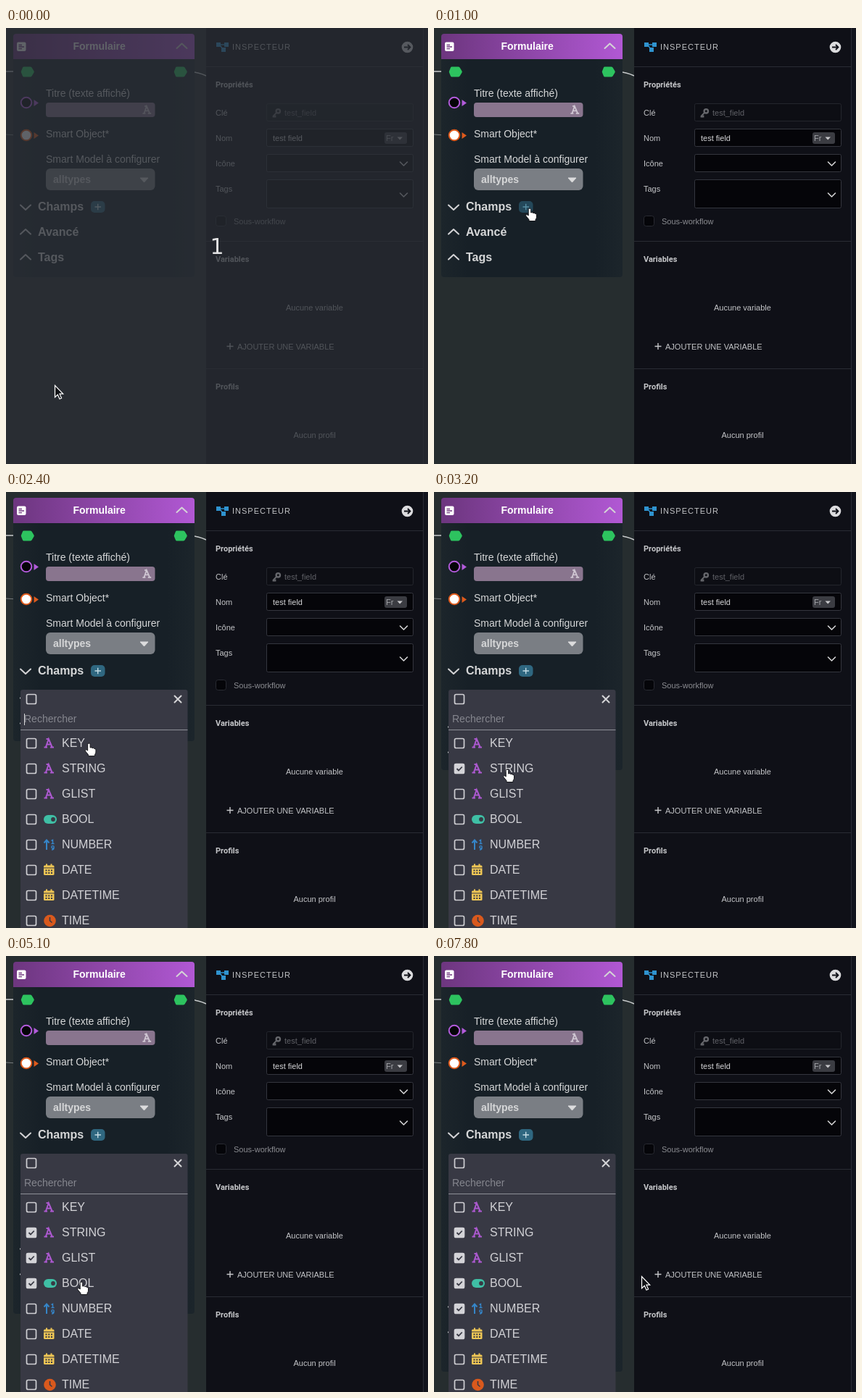
Recreate the animation shown at these times as an HTML page. Size 582 px wide and 602 px high, loop 8000 ms.

```html
<!DOCTYPE html>
<html lang="fr">
<head>
<meta charset="utf-8">
<title>Formulaire</title>
<style>
  html, body { margin: 0; width: 100%; height: 100%; overflow: hidden; background: #262d2f; }
  svg { display: block; width: 582px; height: 602px; font-family: "Liberation Sans", Arial, sans-serif; }
  text { white-space: pre; }
  .line { fill: none; stroke: #d4d4d6; stroke-width: 2; stroke-linecap: round; stroke-linejoin: round; }
  .label { font-size: 14px; fill: #d6d7d8; }
  .section { font-size: 16px; font-weight: bold; fill: #d6d7d8; }
  .row { font-size: 16px; fill: #d2d2d6; }
  .small { font-size: 11px; fill: #c3c4c7; }
  .title { font: bold 11px Roboto, sans-serif; fill: #c6c7ca; }
  .field { fill: #050509; stroke: #34363e; }
  .box { fill: none; stroke: #cfcfd3; stroke-width: 1.7; }
</style>
</head>
<body>
<svg viewBox="0 0 582 602">
  <defs>
    <linearGradient id="head"><stop stop-color="#6d367f"/><stop offset="1" stop-color="#b158d4"/></linearGradient>
    <linearGradient id="body">
      <stop stop-color="#1c252b"/><stop offset=".15" stop-color="#172027"/>
      <stop offset=".85" stop-color="#172027"/><stop offset="1" stop-color="#1c252b"/>
    </linearGradient>
    <path id="hex" d="M4 0H13Q14 0 15 1L18 6Q18.500 7 18 8L15 13Q14 14 13 14H4Q3 14 2.500 13L0.500 8Q0 7 0.500 6L2.500 1Q3 0 4 0Z" fill="#2dc35f"/>
    <path id="up" class="line" d="M0 6.500L7 0L14 6.500"/>
    <path id="down" class="line" d="M0 0L7 6.500L14 0"/>
    <path id="pick" class="line" d="M0 0L5 5L10 0" style="stroke-width:1.600"/>
    <path id="letter" d="M0.500 12.500H5M9 12.500H14M2.800 12.500L6.800 1L11.700 12.500M3.500 1H7.500M4.500 8.500H10" fill="none" stroke-width="2"/>
    <g id="calendar" fill="#eec655">
      <path d="M3 0h2v2h4.500V0h2v2H13q1.500 0 1.500 1.500V5H0V3.500Q0 2 1.500 2H3Z"/>
      <path d="M0 6H14.500V14Q14.500 15.500 13 15.500H1.500Q0 15.500 0 14Z"/>
      <path d="M2.500 9H12M2.500 12.500H12" stroke="#383944" stroke-width="1.800" stroke-dasharray="2 1.750"/>
    </g>
  </defs>

  <rect width="582" height="602" fill="#262d2f"/>
  <path d="M0 60H22M248 60Q264 60 276 66" fill="none" stroke="#c9cccd" stroke-width="1.500"/>
  <path d="M0 147L22 148.500" stroke="#777c7e"/>

  <g id="card">
    <rect id="panel" x="10" y="8" width="250" height="336" rx="4" fill="url(#body)"/>
    <path d="M10 43V12Q10 8 14 8H256Q260 8 260 12V43Z" fill="url(#head)"/>
    <rect x="15" y="19.500" width="12.500" height="12.500" rx="2" fill="#fff"/>
    <path d="M17.500 23.500H22M17.500 26H25M17.500 28.700H22" stroke="#70387f" stroke-width="1.300"/>
    <text x="92.500" y="30" class="label" style="font-weight:bold;fill:#fff">Formulaire</text>
    <use href="#up" x="235.500" y="21.500"/>
    <use href="#hex" x="20.500" y="53.500"/>
    <use href="#hex" x="231.500" y="53.500"/>
    <circle cx="28" cy="103" r="7.300" fill="#050508" stroke="#b35bdb" stroke-width="2"/>
    <path d="M38.500 99L45 103.500L38.500 108Z" fill="#b35bdb"/>
    <circle cx="28" cy="148" r="7.300" fill="#fff" stroke="#de5a1c" stroke-width="2"/>
    <path d="M38.500 144L45 148.500L38.500 153Z" fill="#de5a1c"/>
    <text x="55" y="95" class="label">Titre (texte affiché)</text>
    <rect x="55" y="103" width="150.500" height="20" rx="4" fill="#89758e"/>
    <use href="#letter" transform="translate(188 107) scale(.87)" stroke="#cfc6d2"/>
    <text x="55" y="151" class="label">Smart Object*</text>
    <text x="55" y="186" class="label">Smart Model à configurer</text>
    <rect x="55" y="194" width="150.500" height="30" rx="6" fill="#7a7e84"/>
    <text x="65" y="214" class="label" style="font-weight:bold">alltypes</text>
    <path d="M185 207H196L190.500 213Z" fill="#dcdcdd" stroke="#dcdcdd" stroke-linejoin="round"/>
    <use href="#down" x="20" y="244.500"/>
    <text x="44" y="252" class="section">Champs</text>
    <rect id="add" x="117" y="239" width="19.500" height="16" rx="5"/>
    <path id="addSign" d="M122.500 247H131M126.700 242.700V251.300" stroke-width="1.400"/>
    <g id="below">
      <use href="#up" x="20" y="278"/>
      <text x="44" y="287" class="section">Avancé</text>
      <use href="#up" x="20" y="313"/>
      <text x="44" y="322" class="section">Tags</text>
    </g>
  </g>

  <g id="menu">
    <path d="M20 602V276Q20 273 23 273H247.500Q250.500 273 250.500 276V602Z" fill="#383944"/>
    <rect x="28.500" y="279.500" width="13" height="13" rx="2" class="box"/>
    <path class="line" d="M232.500 281.500L241.500 290.500M241.500 281.500L232.500 290.500"/>
    <text x="25" y="318" class="label" style="fill:#85868e">Rechercher</text>
    <rect id="caret" x="25" y="306" width="1" height="16" fill="#d8d8da"/>
    <path d="M20 328.500H250.500" stroke="#8d8f97"/>
    <g id="rows"></g>
    <g stroke="#ac59cf">
      <use href="#letter" x="52" y="340"/><use href="#letter" x="52" y="375"/><use href="#letter" x="52" y="410"/>
    </g>
    <rect x="52" y="446" width="18" height="12" rx="6" fill="#3fbfa5"/>
    <circle cx="65" cy="452" r="2.900" fill="#383944"/>
    <path d="M56 494V481M52.500 484.500L56 480.500L59.500 484.500" fill="none" stroke="#3585c8" stroke-width="2"/>
    <path d="M62.500 481.500L64.500 480.500V485.500M62.500 485.500H66.500M66 490.500V491.500Q66 494 63 494M66.200 490.300a1.700 1.700 0 1 1 -3.400 0a1.700 1.700 0 1 1 3.400 0" fill="none" stroke="#3585c8" stroke-width="1.400"/>
    <use href="#calendar" x="52" y="513.500"/>
    <use href="#calendar" x="52" y="548.500"/>
    <circle cx="60.500" cy="592" r="8.300" fill="#d9591d"/>
    <path d="M60.500 587V592L63.500 594.500" fill="none" stroke="#383944" stroke-width="1.600"/>
  </g>

  <g id="inspector">
    <rect x="276" width="306" height="602" fill="#0f1017"/>
    <rect x="576" width="6" height="602" fill="#12141c"/>
    <path d="M575.500 0V602M276 53.500H575M276 294.500H575M276 470.500H575" stroke="#2a2c34"/>
    <path d="M294 23H303M295 24L300 30" stroke="#2f93cf" stroke-width="1.500"/>
    <path d="M290 20h6v6h-6ZM301 20h6v6h-6ZM297 27h6v6h-6Z" fill="#2f93cf"/>
    <text x="312" y="30" class="small" letter-spacing="1">INSPECTEUR</text>
    <circle cx="553.500" cy="26.500" r="7.800" fill="#dcdcde"/>
    <path d="M549 26.500H557.500M554 23L557.500 26.500L554 30" fill="none" stroke="#0f1017" stroke-width="1.800"/>
    <rect x="359.500" y="104.500" width="202" height="24" rx="2" class="field" style="fill:#0d0e14;stroke:#24262d"/>
    <rect x="359.500" y="139.500" width="202" height="24" rx="2" class="field"/>
    <rect x="359.500" y="174.500" width="202" height="24" rx="2" class="field"/>
    <rect x="359.500" y="209.500" width="202" height="39" rx="2" class="field"/>
    <rect x="289.500" y="259.500" width="14" height="14" rx="3" class="field" style="stroke:#292b32"/>
    <circle cx="375.300" cy="114.800" r="2.700" fill="none" stroke="#66676c" stroke-width="2.400"/>
    <path d="M373 117L368.500 121.500V122.500H371.500V120.500" fill="none" stroke="#66676c" stroke-width="1.800"/>
    <rect x="522" y="144" width="31" height="16" rx="3" fill="#3b3c42"/>
    <path d="M539.500 150.500H547L543.200 154.500Z" fill="#c9c9cc"/>
    <use href="#pick" x="543.500" y="185"/>
    <use href="#pick" x="543.500" y="228"/>
    <path d="M304.500 439.500H313.500M309 435V444" stroke="#c6c7ca" stroke-width="1.400"/>
    <g id="texts"></g>
  </g>

  <g id="veil">
    <rect width="582" height="602" fill="#2a2e35" fill-opacity=".75"/>
    <text x="291" y="312" text-anchor="middle" style="font:30px 'DejaVu Sans',sans-serif;fill:#e2e2e3">1</text>
  </g>

  <path id="arrow" d="M0.500 0.500V16.800L4.300 13.300L7 19.200L9.600 18L7 12.200H11.700Z" fill="#101216" stroke="#fff" stroke-width="1.200"/>
  <path id="hand" d="M-1.800 1.500Q-1.800 0 0 0Q1.700 0 1.700 1.500V6Q3.500 5 4.700 6.500Q6.300 5.700 7.300 7.300Q9.500 6.800 9.500 9V12Q9.500 14 8 15.500V17.500H-1V15.500L-5 10.800Q-5.700 9.500 -4.500 8.800Q-3.300 8.300 -1.800 10Z" fill="#fff" stroke="#15161a" stroke-width="1"/>
</svg>
<script>
const $ = id => document.getElementById(id);
const LOOP = 8000, TICK = 100, MENU_AT = 1300;

// Moments at which a list row gets ticked
const ticks = { STRING: 3000, GLIST: 4000, BOOL: 5100, NUMBER: 6100, DATE: 7100 };
const names = ['KEY', 'STRING', 'GLIST', 'BOOL', 'NUMBER', 'DATE', 'DATETIME', 'TIME'];

// Pointer hot spot: time, x, y
const path = [
  [0, 67, 493], [100, 67, 493], [900, 131, 250], [1000, 132, 249], [1600, 132, 249],
  [2100, 116, 343], [2300, 116, 343], [2700, 106, 369], [2900, 106, 369], [3200, 101, 383],
  [3700, 102, 409], [4100, 102, 409], [4500, 103, 451], [5000, 103, 451], [5100, 104, 450],
  [5200, 104, 455], [5300, 104, 455], [5600, 107, 482], [6200, 107, 482], [6400, 110, 510],
  [6700, 110, 510], [6800, 108, 511], [7200, 108, 511], [7800, 286, 442], [LOOP, 286, 442]
];

const labels = [
  ['Propriétés', 289, 82, 'title'], ['Variables', 289, 323, 'title'], ['Profils', 289, 499, 'title'],
  ['Clé', 289, 121], ['Nom', 289, 156], ['Icône', 289, 191], ['Tags', 289, 226],
  ['test_field', 384, 121, 'small', '#606167'], ['test field', 368, 156, 'small', '#d6d6d8'],
  ['Fr', 524, 156, 'small', '#a5a6aa'], ['Sous-workflow', 314, 271, 'small', '#8b8c91'],
  ['Aucune variable', 386, 390], ['AJOUTER UNE VARIABLE', 319, 444], ['Aucun profil', 396.5, 566]
];
$('texts').innerHTML = labels.map(([s, x, y, cls = 'small', fill]) =>
  `<text x="${x}" y="${y}" class="${cls}"${fill ? ` style="fill:${fill}"` : ''}>${s}</text>`).join('');

$('rows').innerHTML = names.map((name, i) => {
  const y = 347 + 35 * i;
  return `<rect x="28.500" y="${y - 6.5}" width="13" height="13" rx="2" class="box"/>
    <g id="tick${name}"><rect x="28" y="${y - 7}" width="14" height="14" rx="2" fill="#d3d3d7"/>
    <path d="M31.500 ${y}l2.500 2.500l4.700 -5" fill="none" stroke="#383944" stroke-width="1.800"/></g>
    <text x="77" y="${y + 5}" class="row">${name}</text>`;
}).join('');

const show = (id, on) => $(id).setAttribute('visibility', on ? 'visible' : 'hidden');
const move = (id, x, y) => $(id).setAttribute('transform', `translate(${x} ${y})`);

function pointer(t) {
  const i = path.findIndex(p => p[0] > t);
  const [t0, x0, y0] = path[i - 1], [t1, x1, y1] = path[i];
  const u = (t - t0) / (t1 - t0), k = u * u * (3 - 2 * u);
  return [x0 + (x1 - x0) * k, y0 + (y1 - y0) * k];
}

function draw(time) {
  const t = Math.floor(time % LOOP / TICK) * TICK;
  const [x, y] = pointer(t);
  const open = t >= MENU_AT;
  const onAdd = x > 117 && x < 137 && y > 239 && y < 256;
  const onList = open && x > 20 && x < 250 && y > 273;
  const count = Object.values(ticks).filter(at => t >= at).length;

  show('veil', t < 100);
  show('menu', open);
  // hidden children must follow the menu
  names.forEach(n => show('tick' + n, t >= ticks[n]));
  show('caret', open && t < 3000 && !(t >= 1900 && t < 2400));

  $('panel').setAttribute('height', 336 + 40 * count + (count > 1 ? 30 : 0));
  move('below', 0, 40 * count);
  $('add').setAttribute('fill', onAdd ? '#24485a' : '#2f6780');
  $('addSign').setAttribute('stroke', onAdd ? '#568da3' : '#c4dbe4');

  const hand = onAdd || onList;
  show('hand', hand);
  show('arrow', !hand);
  move('hand', x, y);
  move('arrow', x, y);
}

const start = performance.now();
function loop() {
  draw(performance.now() - start);
  requestAnimationFrame(loop);
}
draw(0);
requestAnimationFrame(loop);
</script>
</body>
</html>
```
